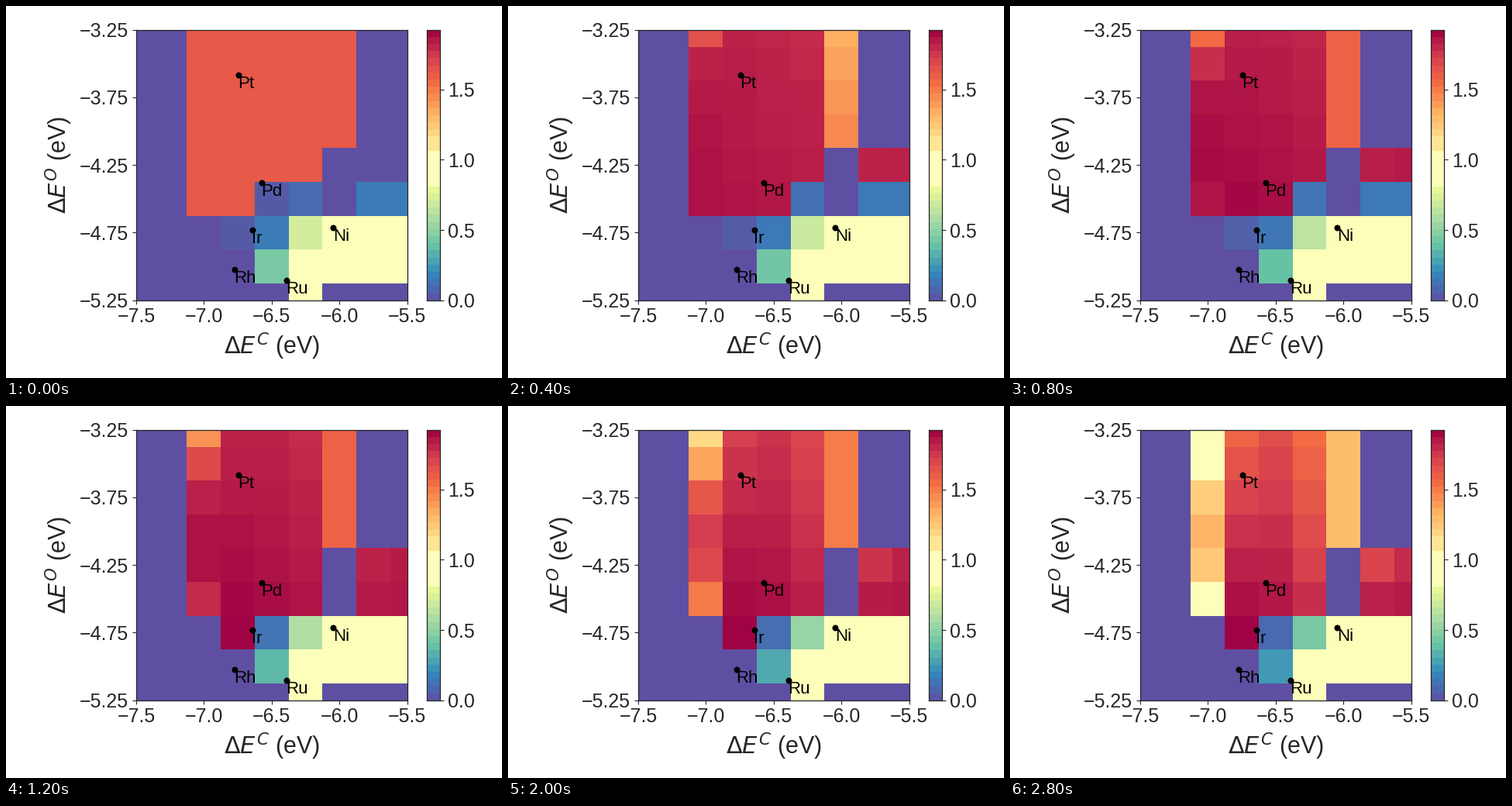
These frames come from a looping animation (640x480 px, 3000 ms). A matplotlib script:

```python
import numpy as np
import matplotlib.pyplot as plt
from matplotlib.animation import FuncAnimation
from matplotlib.colors import ListedColormap

W, H, DPI = 640, 480, 100
FRAMES, STEP = 15, 200
END = 2.8
VMAX = 1.926
BANDS = 38
INK = "0.15"

plt.rcParams.update({
    "font.family": "Liberation Sans",
    "mathtext.fontset": "dejavusans",
    "axes.edgecolor": INK,
    "axes.linewidth": 0.9,
    "xtick.color": INK,
    "ytick.color": INK,
    "xtick.labelsize": 18,
    "ytick.labelsize": 18,
})

# Cool cells: level at the start and at the end, in percent of the scale
COOL = {(5, 4): (2, 2), (5, 5): (5, 12), (5, 7): (8, 6), (5, 8): (8, 6),
        (6, 3): (2, 7), (6, 4): (8, 5), (6, 5): (37, 23), (7, 4): (23, 13)}
# Seconds at which a cell turns hot
IGNITE = {(4, 7): 0.2, (4, 8): 0.2, (5, 4): 0.2,
          (5, 5): 1.0, (5, 7): 1.0, (5, 8): 1.0, (6, 3): 1.2}
METALS = {
    "Pt": (-6.746, -3.585),
    "Pd": (-6.574, -4.382),
    "Ir": (-6.643, -4.731),
    "Ni": (-6.045, -4.714),
    "Rh": (-6.775, -5.023),
    "Ru": (-6.391, -5.104),
}


def fade(row, col):
    """Final loss of a hot cell and the exponent of its decay."""
    if col == 2:
        return (min(48, 30 + 4.5 * (row - 3) ** 2),
                4 - 0.95 * abs(row - 3.3))
    if col >= 7:
        return 8 * 0.4 ** (col - 7) * 0.2 ** (row - 4), 1.5
    depth = 9 + 5.5 * abs(col - 4)
    return depth * (1 - row / 6) ** (1.3 - 0.35 * (col - 3)), 2.3


def hot(t, row, col):
    peak = 96.5 if col >= 7 else 97 + 0.5 * row - 0.7 * (col - 2)
    rise = 1 - np.exp(-t / 0.2)
    loss, power = fade(row, col)
    return 84 + (peak - 84) * rise - loss * (t / END) ** power


def rim(t, row):
    """Column on the right rim: a short dip, then a slow fall."""
    dip = (11 - 2 * row) * np.exp(-((t - 0.4) / 0.15) ** 2)
    return 82.5 - 4.8 * (t - 1) ** 2 - dip if t else 84


def grid(t):
    g = np.zeros((9, 9))
    g[6, 6:] = g[7, 5:] = g[8, 5] = 49
    for row in range(6):
        for col in range(2, min(6, 9 - max(row, 3))):
            g[row, col] = hot(t, row, col)
    for row in range(4):
        g[row, 6] = rim(t, row)
    g[4, 5] = hot(t, 4, 5)
    for cell, (start, end) in COOL.items():
        g[cell] = start + (end - start) * t / END
    for cell, at in IGNITE.items():
        if t > at - 1e-6:
            g[cell] = hot(t, *cell)
    return g


def make_cmap():
    base = plt.get_cmap("Spectral_r")
    f = np.linspace(0, 1, 256)
    f[(f > 16 / BANDS) & (f < 21 / BANDS)] = 0.487
    f[(f >= 21 / BANDS) & (f < 23 / BANDS)] = 0.58
    return ListedColormap(base(f))


def axes_px(x, y, w, h):
    return fig.add_axes([x / W, y / H, w / W, h / H])


cmap = make_cmap()
fig = plt.figure(figsize=(W / DPI, H / DPI), dpi=DPI, facecolor="white")

ax = axes_px(167.9, 100.3, 349.6, 349)
x_edges = -7.625 + 0.25 * np.arange(10)
y_edges = -3.125 - 0.25 * np.arange(10)
mesh = ax.pcolormesh(x_edges, y_edges, grid(0), cmap=cmap, vmin=0, vmax=100)
ax.set(xlim=(-7.5, -5.5), ylim=(-5.25, -3.25),
       xticks=np.arange(-7.5, -5.4, 0.5),
       yticks=np.arange(-5.25, -3.2, 0.5))

for name, (x, y) in METALS.items():
    ax.plot(x, y, "o", color="black", ms=5.8, mew=0, zorder=3)
    ax.annotate(name, (x, y), xytext=(-0.3, -12.4),
                textcoords="offset points", size=16, color="black",
                va="baseline", zorder=4)

bar = axes_px(543.2, 100.3, 17, 349)
centres = 100 * (np.arange(BANDS) + 0.5) / BANDS
bar.pcolormesh([0, 1], np.linspace(0, VMAX, BANDS + 1), centres[:, None],
               cmap=cmap, vmin=0, vmax=100)
bar.set(xlim=(0, 1), ylim=(0, VMAX), xticks=[], yticks=[0, 0.5, 1, 1.5])
bar.yaxis.tick_right()

label = dict(size=22, color=INK, ha="center", va="baseline")
fig.text(342.7 / W, 31 / H, r"$\Delta E^C$ (eV)", **label)
fig.text(78 / W, 274.8 / H, r"$\Delta E^O$ (eV)", rotation=90,
         rotation_mode="anchor", **label)


def update(i):
    mesh.set_array(grid(i * STEP / 1000))
    return [mesh]


anim = FuncAnimation(fig, update, frames=FRAMES, interval=STEP,
                     repeat=True, repeat_delay=0)
plt.show()
```
